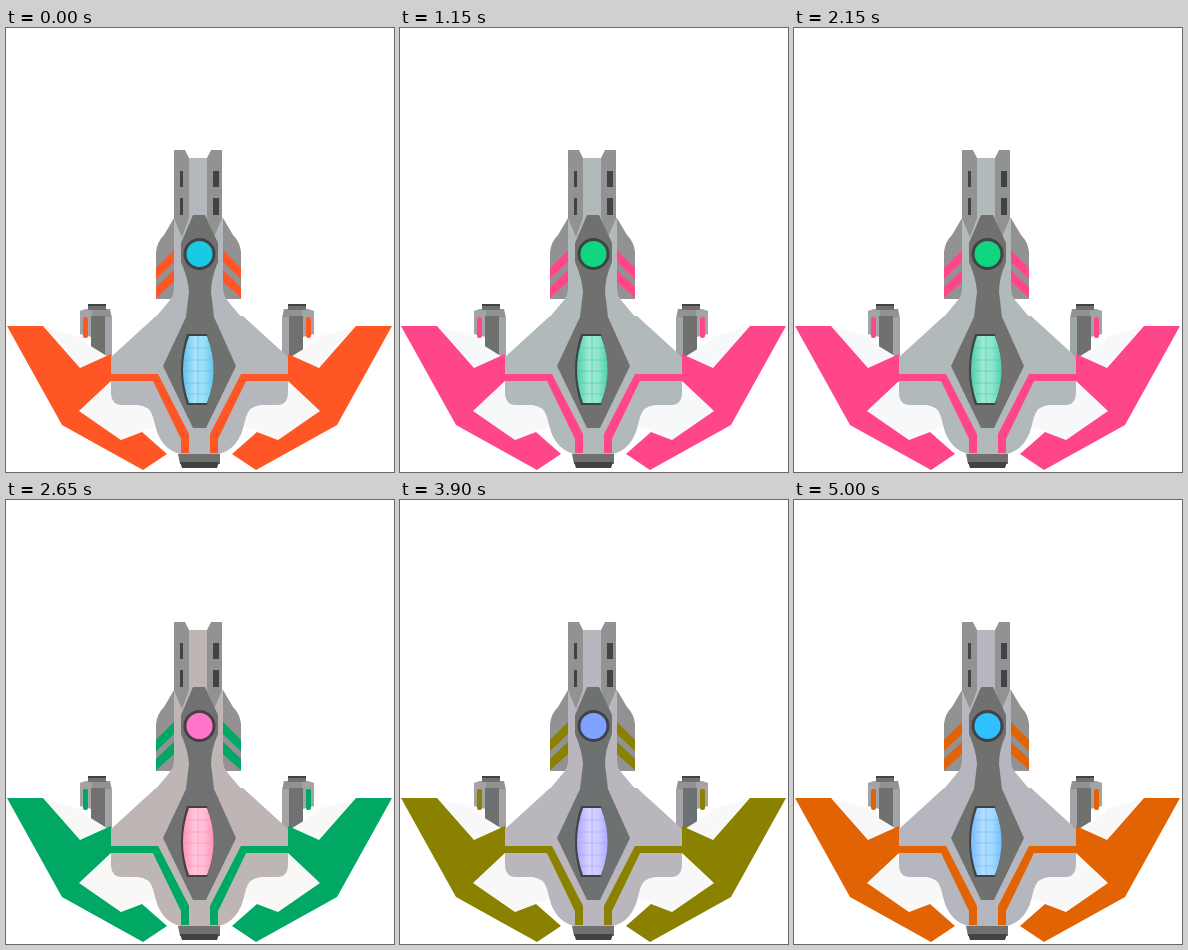
Animation of 388 by 444 pixels, one loop 5050 ms. Source, as an HTML page:

```html
<!DOCTYPE html>
<html lang="en">
<head>
<meta charset="utf-8">
<title>Ship</title>
<style>
  html, body { margin: 0; width: 100%; height: 100%; overflow: hidden; background: #fff; }
  svg { display: block; width: 388px; height: 444px; }
  .paint { fill: #fe5725; }
  .light { fill: #b4b8bd; }
  .mid { fill: #929292; }
  .dark { fill: #6f716f; }
  .black { fill: #424245; }
  .pale { fill: #f8f8f9; }
</style>
</head>
<body>
<svg id="ship" viewBox="0 0 388 444">
  <defs>
    <linearGradient id="glass">
      <stop offset="0" stop-color="#62c2ec"/>
      <stop offset=".4" stop-color="#a8e4f8"/>
      <stop offset=".7" stop-color="#98def6"/>
      <stop offset="1" stop-color="#62c6ee"/>
    </linearGradient>

    <g id="wing">
      <path class="pale" d="M39 299L75 309V312L104 330 75 340ZM73 383L106 354 145 378 152 398 136 403 115 411Z"/>
      <path class="paint" d="M1 298H37L74 340 105 326V353L73 383 115 412 136 404 161 426 137 442 56 397Z"/>
    </g>

    <g id="pod">
      <path class="mid" d="M74 283L80 281H104L106 290V332H86V309L74 306Z"/>
      <path class="light" d="M74 283L80 281H86V309L74 306ZM99 289H106V331H99Z" opacity=".5"/>
      <path class="dark" d="M85 288H99V334H90L85 328Z"/>
      <rect class="dark" x="82" y="278" width="18" height="4"/>
      <rect class="black" x="82" y="276" width="18" height="2"/>
      <rect class="paint" x="77" y="289" width="5" height="21" rx="2"/>
    </g>

    <g id="neck">
      <path class="mid" d="M168 190L158 207Q151 214 150 224V271H180V190Z"/>
      <path class="light" d="M168 190H193V290H149L164 272Q168 267 168 260Z"/>
      <path class="paint" d="M150 240L168 222V234L150 251ZM150 259L168 242V254L150 270Z"/>
    </g>

    <g id="hull">
      <path class="light" d="M194 288H150L105 329V364Q105 377 116 377H132Q144 378 147 389L151 404Q158 422 174 426H194Z"/>
      <path class="paint" d="M105 346H152L183 406V425H175V411L147 353H105Z"/>
    </g>

    <g id="barrel">
      <path class="light" d="M182 130H193V200H182Z"/>
      <path class="mid" d="M168 122H179L183 130V190L176 209 168 190Z"/>
      <path class="black" d="M174 143H177V159H174ZM174 170H177V187H174Z"/>
    </g>
  </defs>

  <use href="#pod"/>
  <use href="#pod" transform="matrix(-1 0 0 1 382 0)"/>
  <use href="#wing"/>
  <use href="#wing" transform="matrix(-1 0 0 1 387 0)"/>
  <use href="#hull"/>
  <use href="#hull" transform="matrix(-1 0 0 1 387 0)"/>
  <use href="#neck"/>
  <use href="#neck" transform="matrix(-1 0 0 1 385 0)"/>
  <use href="#barrel"/>
  <use href="#barrel" transform="matrix(-1 0 0 1 384 0)"/>
  <path class="black" d="M209 143H213V159H209ZM209 170H213V187H209Z"/>

  <path class="dark" d="M187 187H199L212 215V234Q205 250 205 264L208 289 230 338 200 400H187L157 338 180 289 183 264Q182 250 175 234V215Z"/>
  <circle class="black" cx="193.5" cy="226" r="16"/>
  <circle cx="193.5" cy="226" r="13" fill="#18cae3"/>

  <path class="black" d="M181 306H201Q213 342 201 377H181Q169 342 181 306Z"/>
  <path fill="url(#glass)" d="M183 308H201Q214 342 201 375H183Q171 342 183 308Z"/>
  <path d="M180 320H204M178 332H206M177 343H207M178 355H206M181 366H203M192 308V375" fill="none" stroke="#58b8e4" stroke-width=".8" opacity=".65"/>

  <path class="dark" d="M172 426H214V436H174Z"/>
  <path class="black" d="M174 434H213L211 440H176Z"/>
</svg>
<script>
  const FRAME = 50, LOOP = 5050;
  const STEP = -18, LEAD = 16; // degrees of hue
  const ship = document.getElementById("ship");

  function draw(now) {
    const frame = Math.floor((now % LOOP) / FRAME);
    const hue = frame ? (LEAD + STEP * frame) % 360 : 0;
    ship.style.filter = `hue-rotate(${hue}deg)`;
    requestAnimationFrame(draw);
  }
  draw(performance.now());
</script>
</body>
</html>
```
